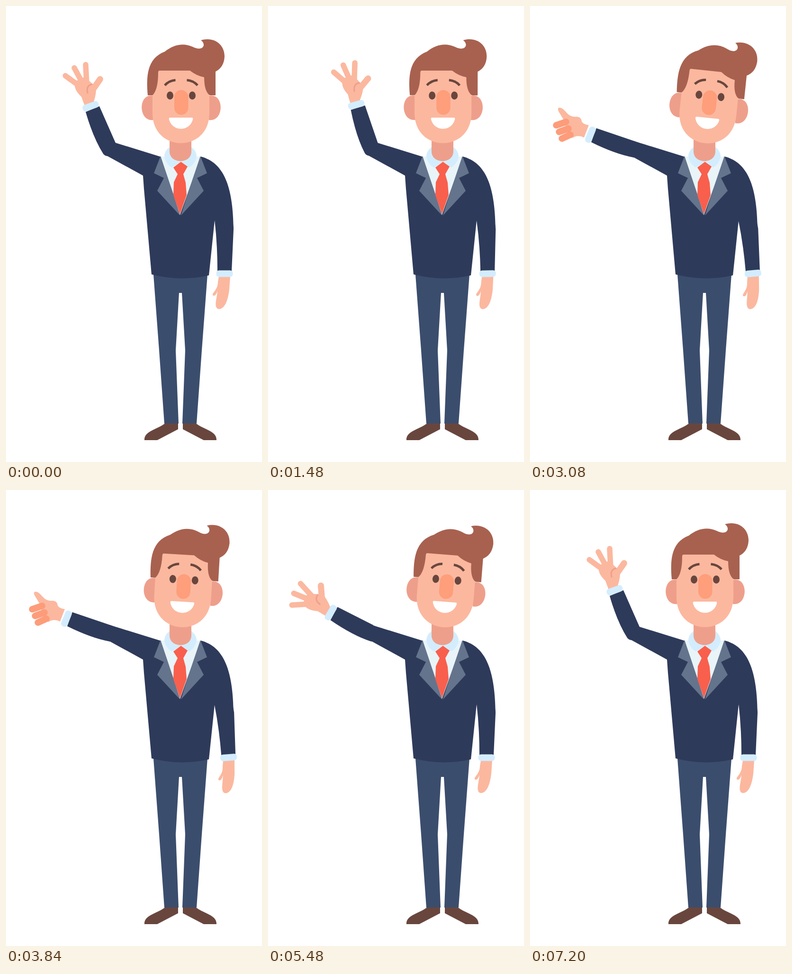
An HTML page that plays this animation: 540x960 px, repeating every 7.68 s.

```html
<!DOCTYPE html>
<html lang="en">
<head>
<meta charset="utf-8">
<title>Waving man</title>
<style>
  html, body { margin: 0; height: 100%; overflow: hidden; background: #fff; }
  svg { display: block; width: 100vw; height: 100vh; }
  .navy { fill: #2e3a5a; }
  .skin { fill: #fbb89f; }
  .blush { fill: #ee9f8b; }
  .pale { fill: #d3edfe; }
  .lapel { fill: #64748d; }
  .pants { fill: #3b4d6d; }
  .dark { fill: #69463d; }
  .hair { fill: #a8614f; }
  .line { fill: none; stroke-linecap: round; }
</style>
</head>
<body>
<svg viewBox="0 0 540 960">
  <defs>
    <rect id="cuff" class="pale" x="-17.500" y="-7" width="35" height="14" rx="6"/>
    <path id="finger" class="line" stroke="#fbb89f" stroke-width="11.500" d="M171 180V123.500"/>
  </defs>

  <g id="leg">
    <path class="pants" d="M311 565H369V604H365L358 725L364 879H334L323 725Z"/>
    <path class="dark" d="M335 879H363V891L319 914H292C291 895 318 892 335 879Z"/>
  </g>
  <use href="#leg" transform="translate(736) scale(-1 1)"/>

  <g id="hang">
    <path class="skin" d="M449 569H473L471 597C469 615 463 638 449 638C437 636 445 616 446 600Q443 610 438 610C430 606 447 600 447 581Z"/>
    <path class="navy" d="M440 450Q446 500 446 558H476L480 470L477 438H442Z"/>
    <use href="#cuff" x="461" y="563.500"/>
  </g>

  <g id="fore">
    <g id="open">
      <path class="skin" d="M166 210L159 191Q142 176 145 159L164 150L176 158L189 170Q192 180 185 202Z"/>
      <use href="#finger" transform="rotate(-54 171 180)"/>
      <use href="#finger" transform="rotate(-28.500 171 180)"/>
      <use href="#finger" transform="rotate(-3 171 180)"/>
      <path class="line" stroke="#fbb89f" stroke-width="13" d="M198.500 154L179 182"/>
      <path class="line" stroke="#ee9f8b" stroke-width="3" d="M172 183C169 171 175 166 181 165"/>
    </g>
    <g id="thumb" transform="rotate(47.500 221 299)">
      <path class="skin" d="M124 251Q112 249 109 243Q108 233 98 233C76 235 76 214 61 214Q57 216 61 223L70 238L78 262L89 278Q101 270 114 277Z"/>
      <path class="line" stroke="#fd9c7a" stroke-width="14" d="M55.500 251L76 244M61.500 265L81 258M67.500 279L85 271"/>
    </g>
    <path class="navy" d="M168 223Q184 278 205 311Q211 319 221 314L231 288L197 211Z"/>
    <use href="#cuff" transform="translate(178.500 211) rotate(-20)"/>
  </g>

  <!-- jacket, shirt and tie -->
  <path class="navy" d="M325 317L231 288L219 284L205 311L289 357L291 385L307 565Q368 581 428 567L440 452L480 470C479 380 460 330 411 317Z"/>
  <path fill="#e9f4f9" d="M326 317H411L367 440Z"/>
  <g id="front">
    <path class="pale" d="M345 297Q333 306 334 319Q339 335 350 340L368 329V297Z"/>
    <path class="lapel" d="M326 316L312 352L333 362L319 389L367 441L353 396Z"/>
  </g>
  <use href="#front" transform="translate(736) scale(-1 1)"/>
  <path class="blush" d="M345 275V307C346 333 390 333 391 307V275Z"/>
  <path fill="#f95f4d" d="M369 328L383 338L374 354L379 372L381 398L367 438L353 398L354 371L362 354L353 340Z"/>

  <g id="head">
    <path id="ear" class="blush" d="M311 189C278 182 278 244 311 240Z"/>
    <use href="#ear" transform="translate(739) scale(-1 1)"/>
    <path class="skin" d="M309 130V225C309 310 429 310 429 225V130Z"/>
    <path class="hair" d="M299 188C296 150 296 111 335 96C354 81 374 77 394 86C415 97 424 81 411 72C438 64 461 80 461 106Q460 129 442 138V188H430Q418 180 418 150Q402 147 388 136H324Q321 136 321 140Q321 176 309 188Z"/>
    <g id="eye">
      <path fill="none" stroke="#69463d" stroke-width="5" d="M335 167Q344 157 357.500 156"/>
      <ellipse class="dark" cx="346" cy="188.500" rx="7" ry="8.500"/>
    </g>
    <use href="#eye" transform="translate(739) scale(-1 1)"/>
    <rect fill="#fe9e7b" x="355" y="177" width="29.500" height="52" rx="14.750"/>
    <path fill="#fff" d="M346 235H392Q395 235 394 239C387 265 351 265 344 239Q343 235 346 235Z"/>
  </g>
</svg>
<script>
const LOOP = 7680, STEP = 40, START = 480;
const LOWER = 1740, SWAP = 2220;    // forearm starts down, open hand becomes thumbs up
const LAST_TILT = 2600, LAST_SWING = 2640;

const part = id => document.getElementById(id);
const show = (id, on) => part(id).setAttribute('visibility', on ? 'visible' : 'hidden');
const turn = (id, angle, x, y) => part(id).setAttribute('transform', `rotate(${angle} ${x} ${y})`);

const ease = x => Math.sin(Math.PI / 2 * Math.min(1, Math.max(0, x))) ** 2;

// 0 to 1 and back once per period; skew below 1 peaks early, above 1 late
const sway = (t, period, skew = 1) => Math.sin(Math.PI * (t / period % 1) ** skew) ** 2;

function draw(now) {
  const t = Math.floor(now % LOOP / STEP) * STEP;
  const p = Math.max(START, Math.min(t, LOOP - t)); // plays forward, then backward

  const tilt = p < LAST_TILT ? sway(p - START, 1060, .75) : sway(p - LAST_TILT, 1800, .75);
  const wave = sway(Math.min(p, LOWER) - START, 840);
  const swing = sway(p < LAST_SWING ? Math.min(p - START, 1620) : p - LAST_SWING, 810, 1.25);

  turn('head', 7.1 * tilt, 368, 286);
  turn('fore', 15.4 * wave - 62.9 * ease((p - LOWER) / 600), 221, 299);
  turn('hang', -5 * swing, 460, 455);
  show('open', p < SWAP);
  show('thumb', p >= SWAP);
}

const begin = performance.now();
function tick() {
  draw(performance.now() - begin);
  requestAnimationFrame(tick);
}
tick();
</script>
</body>
</html>
```
